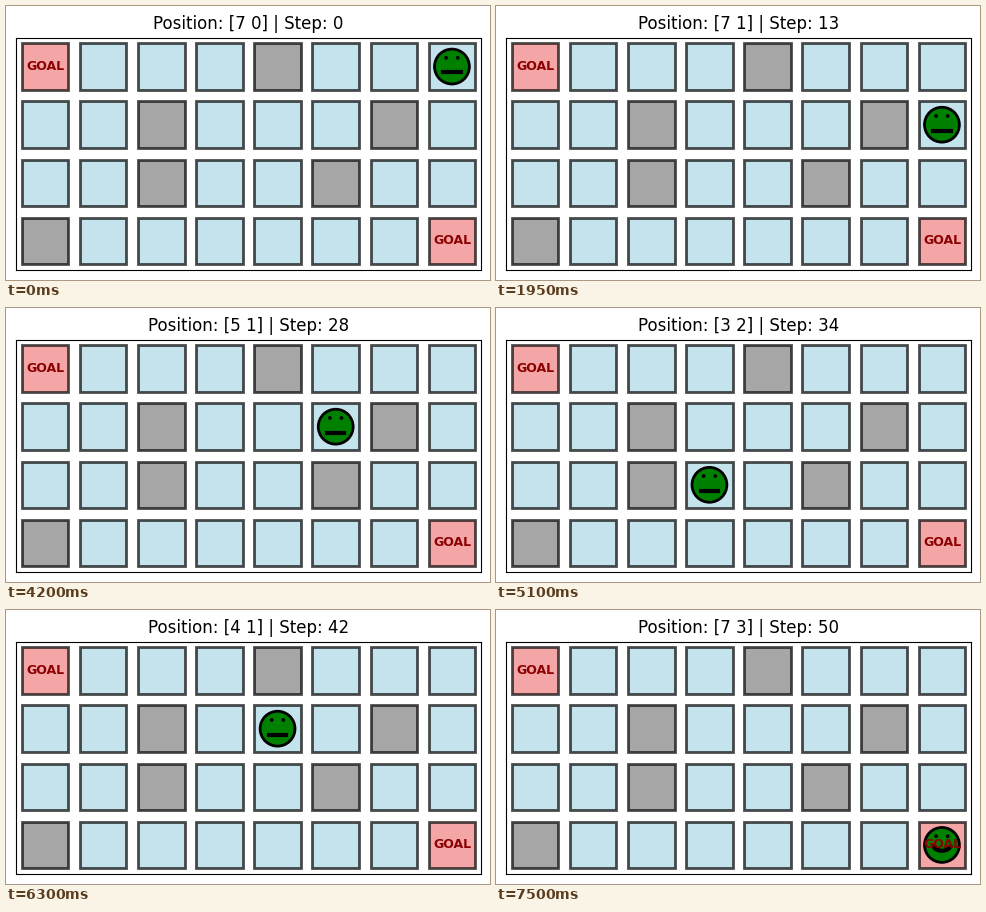
A matplotlib script that plays this animation: 484 by 274 pixels, repeating every 8.25 s.

```python
import matplotlib.pyplot as plt
from matplotlib.animation import FuncAnimation
from matplotlib.patches import Arc, Circle, Rectangle

W, H, DPI = 484, 274, 100
COLS, ROWS = 8, 4
STEP_MS, HOLD = 150, 4  # extra ticks spent on the last step

OBSTACLES = {(4, 0), (2, 1), (6, 1), (2, 2), (5, 2), (0, 3)}
GOALS = {(0, 0), (7, 3)}
START = (7, 0)
MOVES = "..LR... .DU..DD UU.LLDU R.L.D.. .LD.L.D .R.U.U. RUR.RDD D"
DELTAS = {"L": (-1, 0), "R": (1, 0), "U": (0, -1), "D": (0, 1), ".": (0, 0)}

plt.rcParams["font.family"] = "DejaVu Sans"


def walk(start, moves):
    path = [start]
    for move in moves.replace(" ", ""):
        (x, y), (dx, dy) = path[-1], DELTAS[move]
        path.append((x + dx, y + dy))
    return path


def draw_board(ax):
    for x in range(COLS):
        for y in range(ROWS):
            cell = (x, y)
            color = ("gray" if cell in OBSTACLES
                     else "lightcoral" if cell in GOALS else "lightblue")
            ax.add_patch(Rectangle((x - 0.4, y - 0.4), 0.8, 0.8, facecolor=color,
                                   edgecolor="black", linewidth=2, alpha=0.7))
            if cell in GOALS:
                ax.text(x, y, "GOAL", ha="center", va="center", fontsize=9,
                        fontweight="bold", color="darkred")


def draw_face(ax, x, y, happy):
    parts = [Circle((x, y), 0.3, facecolor="green", edgecolor="black", linewidth=2)]
    parts += [Circle((x + dx, y - 0.15), 0.02, color="black") for dx in (-0.1, 0.1)]
    if happy:
        parts.append(Arc((x, y), 0.3, 0.2, theta1=0, theta2=180,
                         color="black", linewidth=3))
    for part in parts:
        ax.add_patch(part)
    if not happy:
        parts += ax.plot([x - 0.15, x + 0.15], [y + 0.1] * 2, color="black", linewidth=3)
    return parts


PATH = walk(START, MOVES)
LAST = len(PATH) - 1

fig = plt.figure(figsize=(W / DPI, H / DPI), dpi=DPI)
ax = fig.add_axes([10 / W, 10 / H, 465 / W, 232.5 / H])
ax.set(xticks=[], yticks=[])
draw_board(ax)
ax.set_xlim(-0.5, COLS - 0.5)
ax.set_ylim(ROWS - 0.5, -0.5)
ax.set_autoscale_on(False)
title = ax.set_title("", fontsize=12)
face = []


def update(frame):
    step = min(frame, LAST)
    x, y = PATH[step]
    while face:
        face.pop().remove()
    face.extend(draw_face(ax, x, y, (x, y) in GOALS))
    title.set_text(f"Position: [{x} {y}] | Step: {step}")
    return [title, *face]


anim = FuncAnimation(fig, update, frames=LAST + 1 + HOLD, init_func=lambda: [],
                     interval=STEP_MS, repeat=True, repeat_delay=0, blit=False)
plt.show()
```
